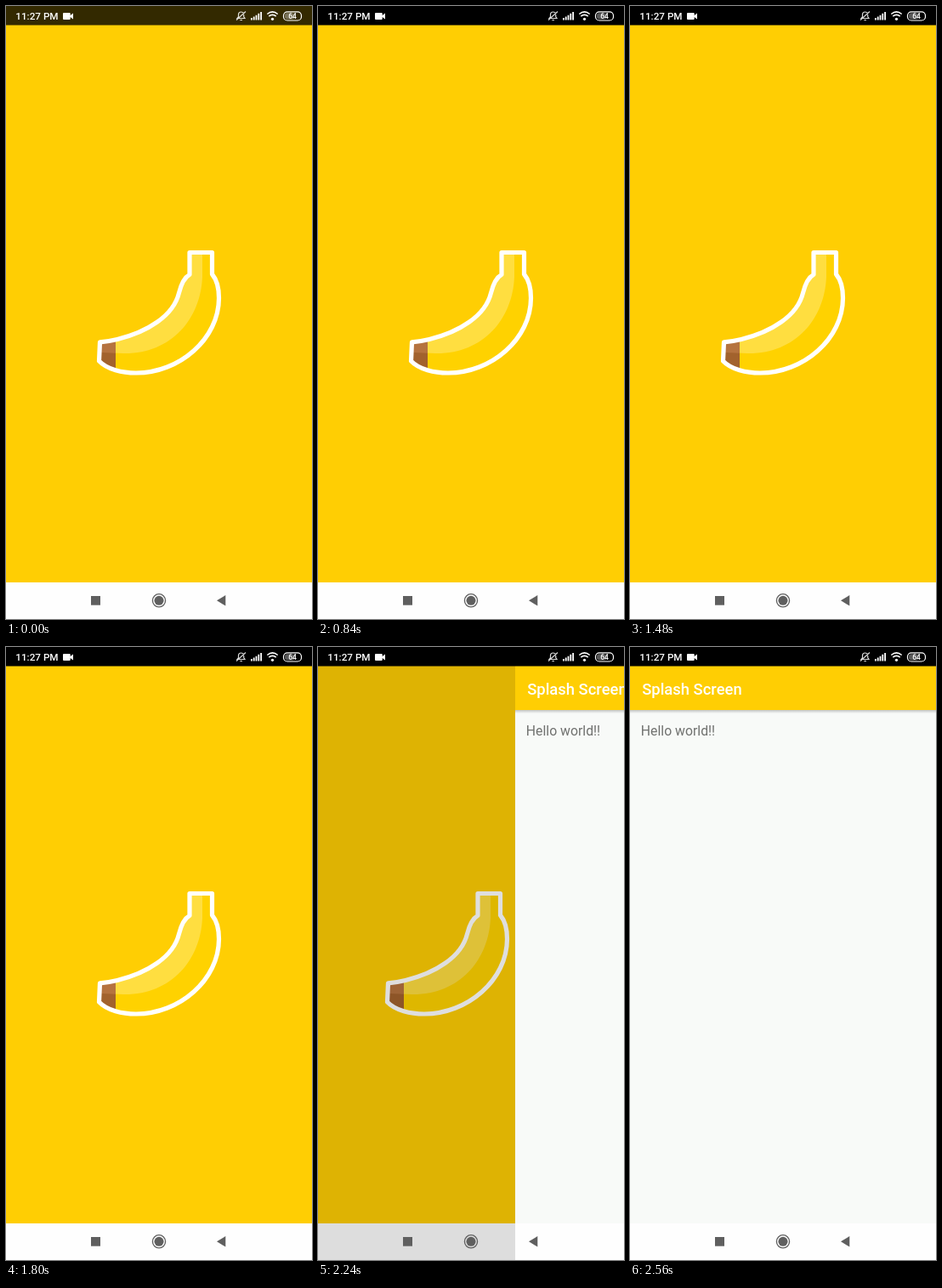
Animation of 360 by 720 pixels, one loop 4480 ms. Source, as an HTML page:

```html
<!DOCTYPE html>
<html lang="en">
<head>
<meta charset="utf-8">
<title>Splash Screen</title>
<style>
  html, body { margin: 0; width: 100%; height: 100%; overflow: hidden; }
  svg { display: block; width: 360px; height: 720px; font-family: Roboto, sans-serif; }
  .line { fill: none; stroke: #fff; }
</style>
</head>
<body>
<svg viewBox="0 0 360 720">
  <defs>
    <path id="outline" d="M216 289.500H242.500V315C247.500 321 250.500 331 250.500 343
      C250.500 391 204 431 153 431C137 431 119 427 109.500 417L110.500 394.800
      C117 394.300 125 393 131 391.500C166 383 197 364 203.500 337C206 327 209.500 319 216 315.500Z"/>
    <clipPath id="inside"><use href="#outline"/></clipPath>
    <linearGradient id="shade" x2="0" y2="1">
      <stop stop-color="#000" stop-opacity=".22"/>
      <stop offset="1" stop-color="#000" stop-opacity="0"/>
    </linearGradient>
  </defs>

  <rect width="360" height="720" fill="#ffce03"/>
  <g id="splash">
    <rect width="460" height="677" fill="#ffce03"/>
    <rect y="677" width="460" height="43" fill="#fefefe"/>
    <g clip-path="url(#inside)">
      <rect x="100" y="280" width="160" height="160" fill="#ffd200"/>
      <path d="M231 285V318C229 368 194 409 138 408L105 406.500V380L200 340V285Z"
        fill="#fff" fill-opacity=".25"/>
      <path d="M105 385H129V430H105Z" fill="#a2622d"/>
      <path d="M105 385H129V407.700L105 406.500Z" fill="#b5733f"/>
    </g>
    <use href="#outline" fill="none" stroke="#fff" stroke-width="5.200" stroke-linejoin="round"/>
  </g>
  <rect id="dim" width="360" height="720"/>

  <g id="page">
    <rect width="360" height="720" fill="#f8faf8"/>
    <rect y="677" width="360" height="43" fill="#fefefe"/>
    <rect y="74" width="360" height="4" fill="url(#shade)"/>
    <rect y="22" width="360" height="52" fill="#ffce03"/>
    <text x="14.200" y="55.500" font-size="18.400" font-weight="500" fill="#fff">Splash Screen</text>
    <text x="12.800" y="104.300" font-size="15.800" fill="#70716f">Hello world!!</text>
  </g>

  <g id="status">
    <rect id="bar" width="360" height="22.500"/>
    <g fill="#fff">
      <text x="11.300" y="15.800" font-size="11.700" font-weight="500">11:27 PM</text>
      <rect x="67" y="8" width="8.700" height="8" rx="1"/>
      <path d="M75 11.500L79 8.500V15.500L75 12.500Z"/>
      <path d="M288 14h1.800v2.500h-1.800zM290.800 12.500h1.800v4h-1.800zM293.600 10.700h1.800v5.800h-1.800zM296.400 8.800h1.800v7.700h-1.800zM299.200 7h1.800v9.500h-1.800z"/>
      <circle cx="313.500" cy="15.300" r="1.600"/>
      <rect x="328" y="8.300" width="11.500" height="7.200" rx="3" fill-opacity=".35"/>
      <text x="337" y="15" font-size="8.500" font-weight="500" text-anchor="middle">64</text>
    </g>
    <g class="line" stroke-width="1.200">
      <path d="M272 14.500H281L279.700 12.500V10C279.700 6 273.500 6 273.500 10V12.500ZM275.300 16.500H278M271 16.500L282 6.500" stroke-opacity=".85"/>
      <path d="M307.300 9.500Q313.500 4.300 319.700 9.500M309.300 12Q313.500 8.700 317.700 12" stroke-width="1.600"/>
      <rect x="326.500" y="6.800" width="21" height="10.200" rx="4.500"/>
    </g>
  </g>

  <g fill="#5f5f5f">
    <rect x="100" y="693" width="11" height="10.700"/>
    <circle cx="180" cy="698.300" r="5.500"/>
    <circle cx="180" cy="698.300" r="7.600" fill="none" stroke="#5f5f5f" stroke-width="1.300"/>
    <path d="M248 698.300L258.300 692V704.600Z"/>
  </g>
</svg>
<script>
  const LOOP = 4480, STEP = 40, WIDTH = 360;
  const BAR_FADE = { start: 360, length: 120 };
  const SLIDE = { start: 2174.5, length: 520, response: 0.65, damping: 0.95 };
  const PARALLAX = 81, MAX_DIM = 0.365;
  const el = id => document.getElementById(id);
  const [splash, dim, page, bar] = ['splash', 'dim', 'page', 'bar'].map(el);

  const progress = (t, { start, length }) => Math.min(1, Math.max(0, (t - start) / length));

  // Lightly underdamped spring from 0 to 1.
  function spring(u, { response, damping }) {
    const natural = 2 * Math.PI / response;
    const decay = damping * natural;
    const freq = natural * Math.sqrt(1 - damping * damping);
    return 1 - Math.exp(-decay * u) * (Math.cos(freq * u) + decay / freq * Math.sin(freq * u));
  }

  const shift = (node, x) => node.setAttribute('transform', `translate(${x} 0)`);

  function draw(now) {
    const t = Math.floor(now % LOOP / STEP) * STEP;
    const slide = spring(progress(t, SLIDE), SLIDE);
    const tint = 1 - progress(t, BAR_FADE);
    shift(splash, -Math.floor(PARALLAX * slide));
    shift(page, Math.floor(WIDTH * (1 - slide)));
    dim.setAttribute('opacity', MAX_DIM * slide);
    bar.setAttribute('fill', `rgb(${51 * tint},${41 * tint},0)`);
  }

  const origin = performance.now();
  function tick() {
    draw(performance.now() - origin);
    requestAnimationFrame(tick);
  }
  tick();
</script>
</body>
</html>
```
